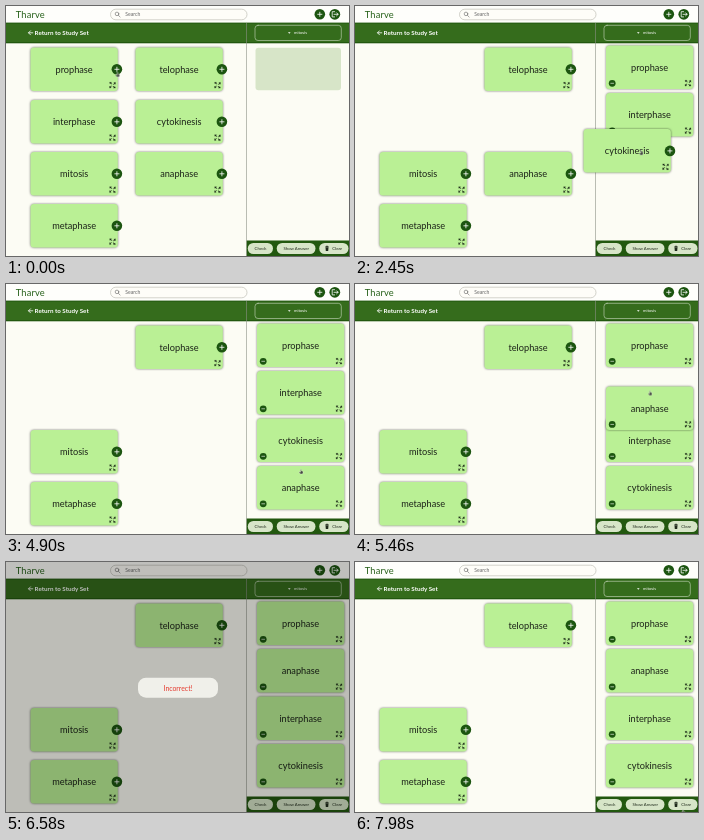
Recreate the animation shown at these times as an HTML page. Size 343x250 px, loop 8 s.

```html
<!DOCTYPE html>
<html lang="en">
<head>
<meta charset="utf-8">
<title>Study set</title>
<style>
  html, body { margin: 0; width: 100%; height: 100%; overflow: hidden; background: #fcfcf4; }
  svg { display: block; width: 100vw; height: 100vh; font-family: Lato, sans-serif; }
  .dark { fill: #1c5510; }
  .bar { fill: #356c1c; }
  .edge { fill: #22580f; }
  .pale { fill: #d7e5c8; }
  .line { fill: none; stroke: #fff; stroke-width: .8; stroke-linecap: round; stroke-linejoin: round; }
  .ink { stroke: #1c2a18; }
  .soft { stroke: #666; stroke-width: .6; }
  .label { font-size: 4.3px; fill: #1f2a1b; text-anchor: middle; }
  .card { --in: 0; }
  .card text { font-size: 9.2px; fill: #1b2118; text-anchor: middle; }
  .face { fill: #baf095; filter: drop-shadow(0 .4px .8px #0008); }
  .plus { opacity: calc(1 - var(--in)); }
  .minus { opacity: var(--in); }

  .card, .empty, .cursor, .hover, .veil, .modal { animation: 8s linear infinite; }
  .prophase { animation-name: prophase; }
  .interphase { animation-name: interphase; }
  .cytokinesis { animation-name: cytokinesis; }
  .anaphase { animation-name: anaphase; }
  .empty { animation-name: empty; }
  .cursor { animation-name: cursor; }
  .hover { animation-name: hover; }
  .veil { animation-name: veil; }
  .modal { animation-name: modal; }

  @keyframes prophase {
    0%, .87% { transform: translate(24.5px, 41.5px); --in: 0; }
    .875%, 100% { transform: translate(251px, 39.5px); --in: 1; }
  }
  @keyframes interphase {
    0%, 12.24% { transform: translate(24.5px, 94px); --in: 0; }
    12.25%, 66.5% { transform: translate(251px, 87px); --in: 1; }
    68.25%, 100% { transform: translate(251px, 134.5px); --in: 1; }
  }
  @keyframes cytokinesis {
    0%, 26.25% { transform: translate(129.5px, 94px); }
    30.625% { transform: translate(228.5px, 123px); }
    32% { transform: translate(235px, 134px); }
    0%, 33.24% { --in: 0; }
    33.24% { transform: translate(235px, 135px); }
    33.25%, 65% { transform: translate(251px, 134.5px); --in: 1; }
    66.5%, 100% { transform: translate(251px, 182px); --in: 1; }
  }
  @keyframes anaphase {
    0%, 42.875% { transform: translate(129.5px, 146px); }
    46.375% { transform: translate(231.5px, 171px); }
    0%, 49.86% { --in: 0; }
    49.86% { transform: translate(236px, 174px); }
    49.875%, 63.875% { transform: translate(251px, 182px); --in: 1; }
    69.125%, 100% { transform: translate(251px, 87px); --in: 1; }
  }
  @keyframes empty {
    0%, .87% { opacity: 1; }
    .875%, 100% { opacity: 0; }
  }
  @keyframes cursor {
    0%, 3% { transform: translate(111.5px, 66px); }
    9.625%, 15% { transform: translate(112px, 117px); }
    22.75%, 26.25% { transform: translate(187px, 115px); }
    30.625% { transform: translate(286px, 144px); }
    32%, 35% { transform: translate(292.5px, 156px); }
    41.125%, 42.875% { transform: translate(182.5px, 161px); }
    46.375% { transform: translate(284.5px, 186px); }
    49.875%, 52.5% { transform: translate(289px, 189px); }
    54.5% { transform: translate(262px, 241px); }
    56%, 57% { transform: translate(270px, 242px); }
    61.25%, 63.875% { transform: translate(295px, 185px); }
    69.125%, 71% { transform: translate(295px, 91px); }
    79.6%, 82.24% { transform: translate(253.5px, 241px); }
    0%, 82.24% { opacity: 1; }
    82.25%, 89.24% { opacity: 0; }
    89.25% { transform: translate(253.5px, 232px); opacity: 1; }
    98.875%, 100% { transform: translate(328px, 247.5px); opacity: 1; }
  }
  @keyframes hover {
    0%, 54.24% { opacity: 0; }
    54.25%, 55.99% { opacity: 1; }
    56%, 78.74% { opacity: 0; }
    78.75%, 82.24% { opacity: 1; }
    82.25%, 100% { opacity: 0; }
  }
  @keyframes veil {
    0%, 81.37% { opacity: 0; }
    81.375%, 82.24% { opacity: .05; }
    82.25% { opacity: .25; }
    83.125%, 89% { opacity: .27; }
    91.875%, 100% { opacity: 0; }
  }
  @keyframes modal {
    0%, 82.24% { opacity: 0; }
    82.25%, 89% { opacity: 1; }
    91.875%, 100% { opacity: 0; }
  }
</style>
</head>
<body>
<svg viewBox="0 0 343 250" preserveAspectRatio="none">
  <defs>
    <g id="add">
      <circle class="dark" r="5.3"/>
      <path class="line" d="M-2.1 0H2.1M0-2.1V2.1"/>
    </g>
    <path id="corner" d="M-2.9-2.9h2l-.6.6 1 1-.4.4-1-1-.6.6z" fill="#1c2a18" stroke="#1c2a18" stroke-width=".25"/>
    <g id="expand">
      <use href="#corner"/>
      <use href="#corner" transform="rotate(90)"/>
      <use href="#corner" transform="rotate(180)"/>
      <use href="#corner" transform="rotate(270)"/>
    </g>
    <g id="card">
      <rect class="face" width="87.3" height="43.5" rx="3.5"/>
      <use href="#expand" x="82" y="37.7"/>
      <use class="plus" href="#add" x="86.4" y="21.8"/>
      <g class="minus">
        <circle class="dark" cx="6.2" cy="37.8" r="3.4"/>
        <path class="line" d="M4.8 37.8h2.8" style="stroke-width:.6"/>
      </g>
    </g>
  </defs>

  <rect width="343" height="250" fill="#fcfcf4"/>
  <rect width="343" height="17" fill="#fefefb"/>
  <text x="9.8" y="12" font-size="9.3" letter-spacing=".15" fill="#27611a">Tharve</text>
  <rect x="104.5" y="3.2" width="136.5" height="10.6" rx="5.3" fill="#fefdf8" stroke="#b5b5ab" stroke-width=".6"/>
  <circle class="line soft" cx="111" cy="7.9" r="1.8"/>
  <path class="line soft" d="M112.4 9.3l1.7 1.7"/>
  <text x="119.3" y="10.4" font-size="5.1" fill="#666">Search</text>
  <use href="#add" x="313.8" y="8.3"/>
  <circle class="dark" cx="328.8" cy="8.3" r="5.4"/>
  <path class="line" d="M328.6 5.7h-2.4v5.2h2.4M328 8.3h4M330.6 6.8l1.5 1.5-1.5 1.5"/>

  <rect class="edge" y="16.6" width="343" height="20.7"/>
  <rect class="bar" y="17.6" width="343" height="18.4"/>
  <path class="line" d="M26.8 26.8h-4.2M24.5 24.8l-2 2 2 2"/>
  <text x="28.6" y="29" font-size="6.25" font-weight="700" fill="#fff">Return to Study Set</text>
  <path d="M240.5 17V250" stroke="#8b9085" stroke-width=".6"/>
  <rect class="line" x="249" y="19.3" width="86.3" height="15.2" rx="3" style="stroke:#c9d8c0;stroke-width:.6"/>
  <path d="M282 26.3h2.6l-1.3 1.5z" fill="#fff"/>
  <text x="288" y="28.4" font-size="4.2" fill="#fff">mitosis</text>
  <rect class="empty pale" x="249.5" y="41.8" width="85.5" height="42.5" rx="3"/>

  <rect class="edge" x="240.7" y="234.5" width="102.3" height="15.5"/>
  <g class="pale">
    <rect x="241.8" y="237" width="25.2" height="11" rx="5.5"/>
    <rect x="270.7" y="237" width="38.8" height="11" rx="5.5"/>
    <rect x="313.2" y="237" width="29.3" height="11" rx="5.5"/>
  </g>
  <g class="label">
    <text x="254.5" y="244">Check</text>
    <text x="290.3" y="244">Show Answer</text>
    <text x="331.2" y="244">Clear</text>
  </g>
  <path d="M319.2 240.5h3.6v.7h-3.6zM320.3 239.8h1.4v.7h-1.4zM319.5 241.6h3l-.3 3.4h-2.4z" fill="#1f2a1b"/>
  <g class="hover">
    <rect x="241.8" y="237" width="25.2" height="11" rx="5.5" fill="#3b4a37"/>
    <text class="label" x="254.5" y="244" style="fill:#eef3e8">Check</text>
  </g>

  <g class="card" transform="translate(129.5 41.5)"><use href="#card"/><text x="43.6" y="25">telophase</text></g>
  <g class="card" transform="translate(24.5 146)"><use href="#card"/><text x="43.6" y="25">mitosis</text></g>
  <g class="card" transform="translate(24.5 198)"><use href="#card"/><text x="43.6" y="25">metaphase</text></g>
  <g class="card prophase"><use href="#card"/><text x="43.6" y="25">prophase</text></g>
  <g class="card interphase"><use href="#card"/><text x="43.6" y="25">interphase</text></g>
  <g class="card cytokinesis"><use href="#card"/><text x="43.6" y="25">cytokinesis</text></g>
  <g class="card anaphase"><use href="#card"/><text x="43.6" y="25">anaphase</text></g>

  <rect class="veil" width="343" height="250"/>
  <g class="modal">
    <rect x="132" y="115.7" width="80" height="20" rx="8" fill="#f0f0ea"/>
    <text x="172" y="129" font-size="6.9" text-anchor="middle" fill="#e5392d">Incorrect!</text>
  </g>
  <path class="cursor" d="M-.5 .4h.9v1.5l1.6.4v1.6l-.6 1h-2l-1.3-1.7.4-.5 1 .5z" fill="#454b42" stroke="#eef3e8" stroke-width=".35"/>
</svg>
</body>
</html>
```
